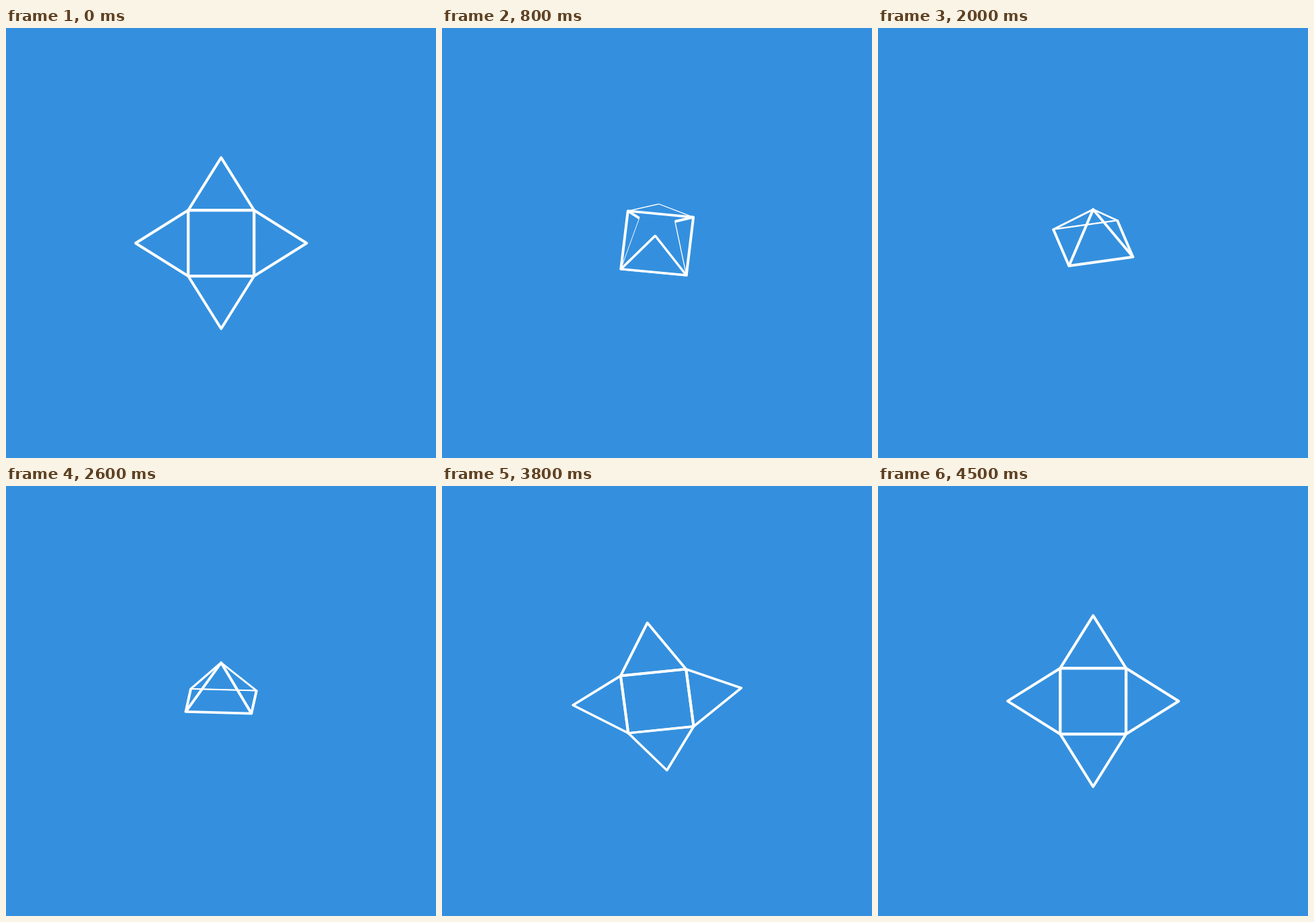
An HTML page with a canvas that plays this animation: 640 px wide and 640 px high, repeating every 4.6 s.

```html
<!DOCTYPE html>
<html>
<head>
<meta charset="utf-8">
<style>
  html, body { margin: 0; width: 100%; height: 100%; overflow: hidden; background: #3490de; }
  canvas { display: block; }
</style>
</head>
<body>
<canvas id="stage" width="640" height="640"></canvas>
<script>
const ctx = document.getElementById('stage').getContext('2d');
const { PI, sin, cos, acos, min, max, floor } = Math;
const LOOP = 4600, STEP = 100;
const SIZE = 640, CENTER = 320.2, HALF = 49, FLAP = 78.3;
const DEG = PI / 180;
const CLOSED = acos(-HALF / FLAP); // flap angle at which the four tips meet

// Sine ease from 0 to 1 between two times.
function ease(t, start, end) {
  const x = max(0, min(1, (t - start) / (end - start)));
  return (1 - cos(PI * x)) / 2;
}

function draw(t) {
  // Fold up while leaning back, spin as a pyramid, then unfold while turning flat.
  const lean = ease(t, 0, 1400), whirl = ease(t, 1450, 2700);
  const tilt = DEG * (45 * lean + 25 * whirl - 70 * ease(t, 2920, 4500));
  const spin = DEG * (10 * lean - 280 * whirl - 180 * ease(t, 3020, 4510));
  const fold = CLOSED * (ease(t, 0, 1100) - ease(t, 2910, 4000));

  // Orthographic view of a point turned by an angle about the upright axis, then tilted.
  const project = (angle, x, y, z = 0) => [
    x * cos(angle) - y * sin(angle),
    (x * sin(angle) + y * cos(angle)) * cos(tilt) - z * sin(tilt)
  ];

  // Draws in a tilted plane, so that line weights are foreshortened too.
  function usePlane(across, along, [x, y]) {
    ctx.setTransform(...across, ...along, CENTER + x, CENTER + y);
  }

  ctx.resetTransform();
  ctx.fillStyle = '#3490de';
  ctx.fillRect(0, 0, SIZE, SIZE);
  ctx.strokeStyle = '#fff';
  ctx.lineWidth = 4;
  ctx.lineJoin = 'round';

  usePlane(project(spin, 1, 0), project(spin, 0, 1), [0, 0]);
  ctx.strokeRect(-HALF, -HALF, 2 * HALF, 2 * HALF);

  for (let side = 0; side < 4; side++) {
    const angle = spin + side * PI / 2;
    usePlane(project(angle, 1, 0), project(angle, 0, cos(fold), sin(fold)), project(angle, 0, HALF));
    ctx.beginPath();
    ctx.moveTo(-HALF, 0);
    ctx.lineTo(HALF, 0);
    ctx.lineTo(0, FLAP);
    ctx.closePath();
    ctx.stroke();
  }
}

const begin = performance.now();
function tick() {
  const t = (performance.now() - begin) % LOOP;
  draw(floor(t / STEP) * STEP);
  requestAnimationFrame(tick);
}
tick();
</script>
</body>
</html>
```
